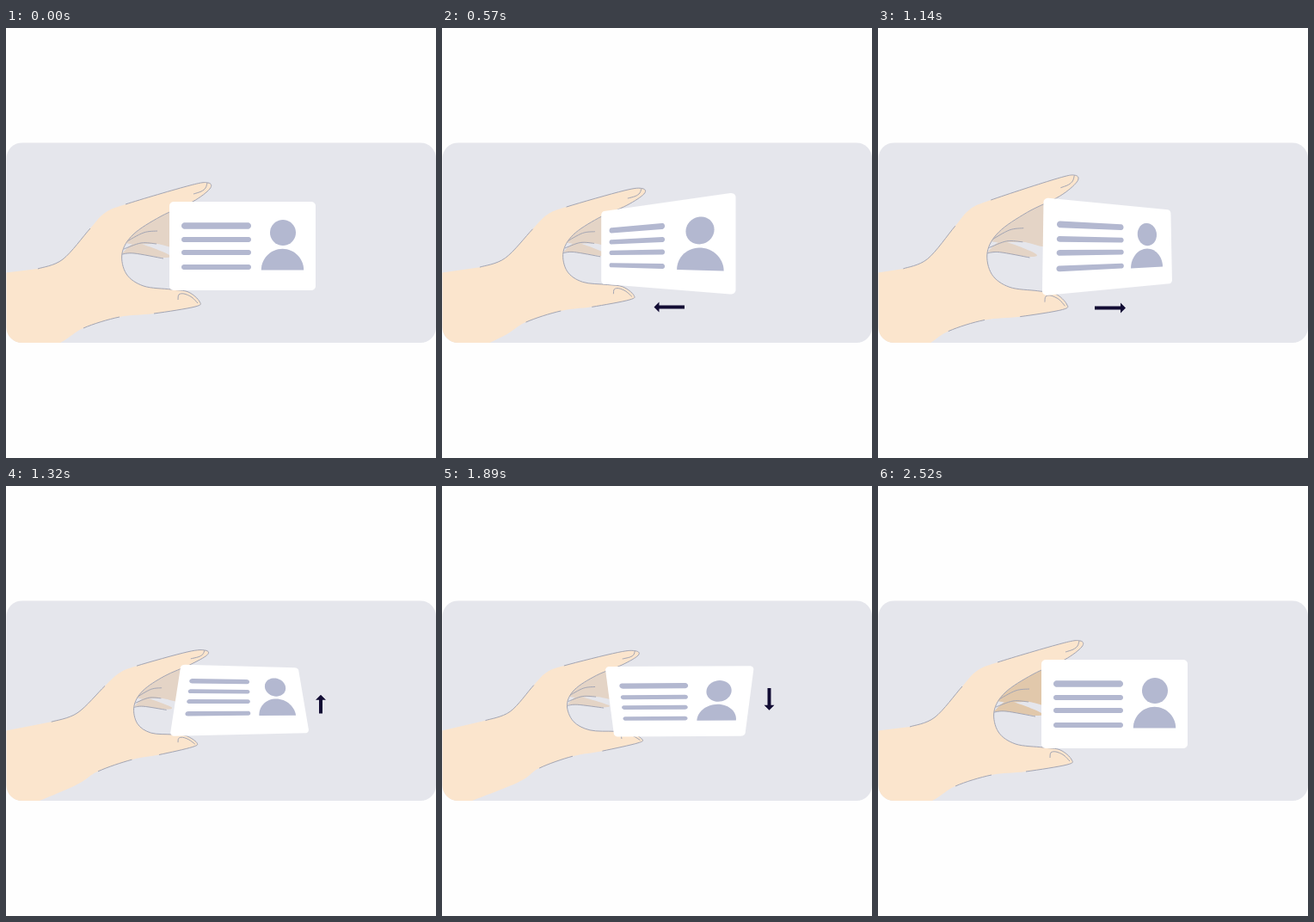
Recreate the animation shown at these times as an HTML page with a canvas. Size 500 px wide and 500 px high, loop 3.18 s.

```html
<!DOCTYPE html>
<html lang="en">
<head>
<meta charset="utf-8">
<title>Tilting an ID card</title>
<style>
  html, body { margin: 0; width: 100%; height: 100%; overflow: hidden; background: #fefefe; }
  canvas { display: block; width: 500px; height: 500px; }
</style>
</head>
<body>
<canvas id="stage" width="500" height="500"></canvas>
<script>
const ctx = document.getElementById('stage').getContext('2d');
const LOOP = 3180, STEP = 30;
const LINE = '#a3a5b3', SKIN = '#fbe5cd', INK = '#b3b8d0', ARROW = '#120c34';

const pairs = s => s.split(' ').map(p => p.split(',').map(Number));

// resting hand, clockwise from the wrist, and the far fingers behind it
const OUTLINE = pairs('37,280 66,269 98,233 115,215 139,205 214,183 235,180 237,187 217,202 ' +
  '180,219 148,240 135,262 140,286 160,300 192,304 212,307 225,318 220,324 172,332 132,336 ' +
  '90,349 63,366 10,392');
const INKED = [[0, 2], [4, 18], [19, 20]];
const NAILS = ['218,193 227,190 232,186 234,180', '200,316 201,310 207,309 216,313 223,320'].map(pairs);
const FINGERS = ['138,250 150,238 190,212 206,212 206,254 175,251 150,252',
  '135,262 148,251 163,253 190,264 183,267 150,262'].map(pairs);
const CREASES = ['139,249 160,238 176,236', '137,257 157,250 175,251', '135,263 149,262 183,268'].map(pairs);

// palm, tip, pinch, lift, shear bend the hand; yaw, pitch, roll turn the card;
// slide and rise move what is printed on it
const flat = {
  palm: 0, tip: 0, pinch: 0, lift: 0, shear: 0, warm: 0,
  cx: 275, cy: 253.5, w: 170, h: 103, yaw: 0, pitch: 0, roll: 0, slide: 0, rise: 0
};
const rest = { ...flat, warm: 1 };
const right = { ...flat, palm: 8, tip: -2, pinch: 0.1, lift: 1,
  cx: 263.3, cy: 253, w: 156.5, h: 101.5, yaw: 0.18, roll: -2.5, slide: 3 };
const left = { ...flat, palm: -12, tip: -6, pinch: -0.12, lift: -4,
  cx: 265.7, cy: 255, w: 149.5, h: 102.7, yaw: -0.158, slide: -2 };
const up = { ...flat, palm: 29, tip: -2, pinch: 0.34,
  cx: 274, cy: 247, w: 149, h: 70, pitch: 0.122, rise: 2 };
const down = { ...flat, palm: 7, tip: -1, pinch: 0.22, lift: -3, shear: 0.15,
  cx: 276.7, cy: 251, w: 165.5, h: 84, pitch: -0.106, roll: -0.5, rise: 2 };

const moves = [
  { from: flat, to: right, start: 0, end: 540, arrow: { x: 282, y: 324.5, turn: 2, len: 35.5 } },
  { from: right, to: left, start: 540, end: 1080, arrow: { x: 252, y: 325.5, turn: 0, len: 36 } },
  { from: left, to: up, start: 1080, end: 1620, arrow: { x: 366, y: 264.5, turn: 3, len: 38.5 } },
  { from: up, to: down, start: 1620, end: 2130, arrow: { x: 380.5, y: 235, turn: 1, len: 34 } },
  { from: down, to: rest, start: 2160, end: 2520 }
];

const clamp = v => Math.max(0, Math.min(1, v));
const lerp = (a, b, p) => a + (b - a) * p;

// quick rise with a long settle
function ease(t) {
  const s = 1 - (1 - t) ** 1.75;
  return s * s * (3 - 2 * s);
}

function mix(a, b, p) {
  const pose = {};
  for (const key in a) pose[key] = lerp(a[key], b[key], p);
  return pose;
}

// the palm slides, the fingertips close and the wrist stays put
function bend({ palm, tip, pinch, lift, shear }) {
  return ([x, y]) => {
    const reach = clamp((x - 120) / 95), loose = clamp(x / 40);
    const sway = 0.45 + 0.55 * x / 200;
    return [x + loose * (lerp(palm, tip, reach) + shear * (y - 250)),
            y + sway * (lift - pinch * (y - 235))];
  };
}

// perspective map from a 170 x 103 card onto the turned card
function project({ cx, cy, w, h, yaw, pitch, roll }) {
  const corner = (sx, sy) =>
    [cx + sx * w / 2 * (1 + pitch * sy), cy + sy * h / 2 * (1 + yaw * sx) + roll * sx];
  const [x0, y0] = corner(-1, -1), [x1, y1] = corner(1, -1);
  const [x2, y2] = corner(1, 1), [x3, y3] = corner(-1, 1);
  const dx1 = x1 - x2, dx2 = x3 - x2, sx = x0 - x1 + x2 - x3;
  const dy1 = y1 - y2, dy2 = y3 - y2, sy = y0 - y1 + y2 - y3;
  const det = dx1 * dy2 - dx2 * dy1;
  const g = (sx * dy2 - dx2 * sy) / det, k = (dx1 * sy - sx * dy1) / det;
  return ([x, y]) => {
    const u = x / 170, v = y / 103, d = g * u + k * v + 1;
    return [((x1 - x0 + g * x1) * u + (x3 - x0 + k * x3) * v + x0) / d,
            ((y1 - y0 + g * y1) * u + (y3 - y0 + k * y3) * v + y0) / d];
  };
}

// smooth curve through pts[from..to]
function curve(pts, from = 0, to = pts.length - 1) {
  const at = i => pts[Math.max(0, Math.min(pts.length - 1, i))];
  ctx.lineTo(...at(from));
  for (let i = from; i < to; i++) {
    const [a, b, c, d] = [at(i - 1), at(i), at(i + 1), at(i + 2)];
    ctx.bezierCurveTo(b[0] + (c[0] - a[0]) / 6, b[1] + (c[1] - a[1]) / 6,
      c[0] - (d[0] - b[0]) / 6, c[1] - (d[1] - b[1]) / 6, c[0], c[1]);
  }
}

function strokeCurve(pts, from, to) {
  ctx.beginPath();
  curve(pts, from, to);
  ctx.stroke();
}

function fill(color, trace) {
  ctx.beginPath();
  trace();
  ctx.closePath();
  ctx.fillStyle = color;
  ctx.fill();
}

const fillPoly = (pts, color) => fill(color, () => pts.forEach(p => ctx.lineTo(...p)));

function arc(cx, cy, r, a0, a1, n) {
  return Array.from({ length: n + 1 }, (_, i) => {
    const a = lerp(a0, a1, i / n);
    return [cx + r * Math.cos(a), cy + r * Math.sin(a)];
  });
}

function roundBox(x, y, w, h, r) {
  const q = Math.PI / 2;
  return [[x + w - r, y + h - r], [x + r, y + h - r], [x + r, y + r], [x + w - r, y + r]]
    .flatMap(([cx, cy], i) => arc(cx, cy, r, i * q, (i + 1) * q, 8));
}

function drawHand(pose) {
  const warp = bend(pose);
  const bent = list => list.map(pts => pts.map(warp));
  const tint = `rgb(${lerp(228, 225, pose.warm)}, ${lerp(212, 200, pose.warm)}, ${lerp(198, 171, pose.warm)})`;
  bent(FINGERS).forEach(pts => fill(tint, () => curve(pts)));
  bent(CREASES).forEach(pts => strokeCurve(pts));

  const hand = OUTLINE.map(warp);
  fill(SKIN, () => {
    ctx.moveTo(0, 284.5);
    curve(hand);
    ctx.lineTo(0, hand[hand.length - 1][1]);
  });
  INKED.forEach(([a, b]) => strokeCurve(hand, a, b));
  bent(NAILS).forEach(pts => strokeCurve(pts));
}

function drawCard(pose) {
  const { slide, rise } = pose, map = project(pose);
  const shape = (pts, color) => fillPoly(pts.map(map), color);
  shape(roundBox(0, 0, 170, 103, 5), '#fff');
  [28, 44, 59, 76].forEach((y, i) => {
    const t = i ? 6.2 : 7.4;
    shape(roundBox(14, y - t / 2 - rise, 81, t, t / 2), INK);
  });
  shape(arc(132 + slide, 36 - rise, 15, 0, Math.PI * 2, 40), INK);
  shape(arc(131.5 + slide, 79.5 - rise, 24.7, Math.PI, Math.PI * 2, 30), INK);
}

function drawArrow({ x, y, turn, len }, grow) {
  const l = lerp(6, len, grow);
  ctx.save();
  ctx.translate(x, y);
  ctx.rotate(turn * Math.PI / 2);
  fillPoly([[0, -2], [l - 6, -2], [l - 6, -6], [l, 0], [l - 6, 6], [l - 6, 2], [0, 2]], ARROW);
  ctx.restore();
}

function draw(time) {
  const k = moves.findLastIndex(m => time >= m.start);
  const { from, to, start, end, arrow } = moves[k];
  const t = clamp((time - start) / (end - start));
  const pose = mix(from, to, ease(t));

  ctx.fillStyle = '#fefefe';
  ctx.fillRect(0, 0, 500, 500);
  ctx.save();
  ctx.beginPath();
  ctx.roundRect(0.5, 133.5, 499.5, 232.5, 18);
  ctx.fillStyle = '#e5e6ec';
  ctx.fill();
  ctx.clip();
  ctx.strokeStyle = LINE;
  drawHand(pose);
  drawCard(pose);
  const grow = clamp((t - 0.26) / 0.38);
  if (arrow && grow > 0) drawArrow(arrow, grow);
  else if (k && t < 0.2) drawArrow(moves[k - 1].arrow, 1);
  ctx.restore();
}

let origin;
function tick(now) {
  origin ??= now;
  const time = (now - origin) % LOOP;
  draw(Math.floor(time / STEP + 0.01) * STEP);
  requestAnimationFrame(tick);
}
draw(0);
requestAnimationFrame(tick);
</script>
</body>
</html>
```
